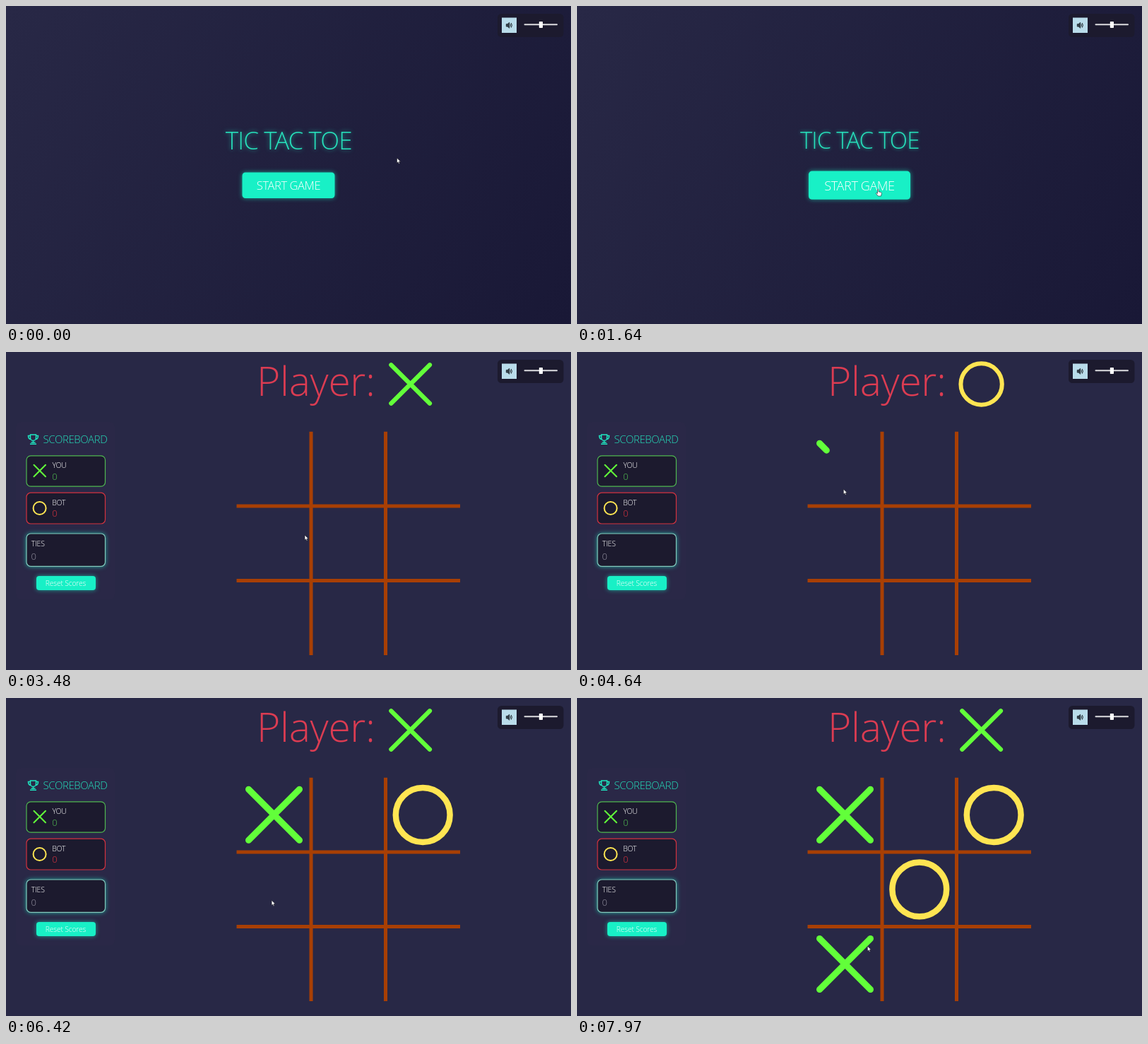
An HTML page for the animation above (8 s loop, 800 by 450 pixels).

```html
<!DOCTYPE html>
<html lang="en">
<head>
<meta charset="utf-8">
<title>Tic Tac Toe</title>
<style>
  html, body { margin: 0; width: 100%; height: 100%; overflow: hidden; background: #282846; }
  svg { display: block; width: 100vw; height: 100vh; }
  text { font-family: "Open Sans", "Noto Sans", sans-serif; font-weight: 300; }
  .mid { text-anchor: middle; }
  .mark { fill: none; stroke-linecap: round; }
  .glow { filter: drop-shadow(0 0 3px rgba(24, 236, 196, .6)); }
  .card { fill: #1c1a2e; stroke-width: 1.2; }
</style>
</head>
<body>
<svg id="stage" viewBox="0 0 800 450">
  <defs>
    <linearGradient id="bg" gradientUnits="userSpaceOnUse" x1="2.6" y1="-4.5" x2="797.4" y2="454.5">
      <stop stop-color="#282846"/><stop offset="1" stop-color="#191836"/>
    </linearGradient>
  </defs>
  <rect width="800" height="450" fill="#282846"/>

  <g id="menu">
    <rect width="800" height="450" fill="url(#bg)"/>
    <g id="title" class="glow">
      <text class="mid" y="12.5" font-size="35" letter-spacing="-.9" fill="#27dfba">TIC TAC TOE</text>
    </g>
    <g id="start">
      <rect class="glow" x="-65.5" y="-18.3" width="131" height="36.6" rx="4.5" fill="#18f0c6"/>
      <text class="mid" y="6.5" font-size="16.5" letter-spacing="-.4" fill="#fff">START GAME</text>
    </g>
  </g>

  <g id="game">
    <rect x="14" y="99" width="140" height="251" rx="7" fill="#2a2847"/>
    <g fill="none" stroke="#1fe6c0" stroke-width="1.5">
      <path d="M34.5 117h8v4.5a4 4 0 0 1-8 0zM34.5 118.5h-3q0 5 4 5M42.5 118.5h3q0 5-4 5M38.5 125.5v3M34 130.2h9"/>
      <path d="M35.5 128h6"/>
    </g>
    <text x="52.5" y="129" font-size="15" letter-spacing="-.4" fill="#25dcb9">SCOREBOARD</text>

    <rect class="card" x="29" y="146.8" width="111.5" height="43.4" rx="6" stroke="#4fb850"/>
    <path class="mark" d="M39.5 159.8l16.5 16.5M56 159.8l-16.5 16.5" stroke="#62ff3a" stroke-width="2"/>
    <text x="65.5" y="164.2" font-size="10.5" letter-spacing="-.3" fill="#fff">YOU</text>
    <text x="65.3" y="180.5" font-size="13" fill="#4fb850">0</text>

    <rect class="card" x="29" y="199.2" width="111.5" height="43.8" rx="6" stroke="#d3323f"/>
    <circle class="mark" cx="47.6" cy="221" r="9" stroke="#ffe552" stroke-width="2"/>
    <text x="65.2" y="217" font-size="10.5" letter-spacing="-.3" fill="#fff">BOT</text>
    <text x="65.3" y="233.3" font-size="13" fill="#d3323f">0</text>

    <rect class="card glow" x="29" y="257" width="111.5" height="46.3" rx="6" stroke="#83c9bd"/>
    <text x="35.8" y="275" font-size="10.5" letter-spacing="-.2" fill="#fff">TIES</text>
    <text x="35.5" y="293.5" font-size="13" fill="#8d8b9a">0</text>

    <rect class="glow" x="43" y="317" width="84" height="20" rx="4" fill="#18f0c6"/>
    <text class="mid" x="84.5" y="331" font-size="10.3" letter-spacing="-.15" fill="#fff">Reset Scores</text>

    <text x="355" y="62" font-size="57" letter-spacing="-.3" fill="#dc3c52">Player:</text>
    <path id="turnX" class="mark" d="M545.3 18.3l54.7 54.5M600 18.3l-54.7 54.5" stroke="#62ff3a" stroke-width="6.2"/>
    <circle id="turnO" class="mark" cx="572.6" cy="45.5" r="29.2" stroke="#ffe552" stroke-width="6"/>
    <g id="grid" stroke="#a83f04" stroke-width="5"></g>
    <g id="marks"></g>
  </g>

  <rect x="696" y="11" width="93.5" height="33" rx="5.5" fill="#1c1a2e"/>
  <rect x="702" y="16.5" width="21" height="21.5" fill="#b9dcea"/>
  <path d="M708.3 25.5h1.8l2.6-2.2v8l-2.6-2.2h-1.8z" fill="#33404a" stroke="#1b2229" stroke-width=".7"/>
  <path d="M714 25.5q1.2 1.8 0 3.6M715.2 24q2.4 3.3 0 6.6" fill="none" stroke="#1b2229"/>
  <rect x="733.5" y="25.2" width="47.5" height="2" rx="1" fill="#dddde0"/>
  <rect x="754.8" y="22" width="5.2" height="9" rx=".8" fill="#fff"/>

  <g id="cursor" fill="#fff" stroke="#15151f" stroke-width=".6" stroke-linejoin="round">
    <path id="arrow" d="M0 0V7.2L1.6 5.8 2.7 8.2 3.9 7.7 2.9 5.3H5.2Z"/>
    <path id="hand" d="M0 .6Q.8-.5 1.5.6V3.8L5 4.6Q6 5 5.8 6.4L5 10H.8L-2 6.4Q-2 5.2-1 5.6L0 6.4Z"/>
  </g>
</svg>
<script>
const LOOP = 8000, MENU_END = 2400, GAME_START = 2550;
const GREEN = '#62ff3a', YELLOW = '#ffe552';
const $ = id => document.getElementById(id);
const clamp = v => Math.max(0, Math.min(1, v));
const span = (t, from, ms) => clamp((t - from) / ms);
const ease = p => p * p * (3 - 2 * p);
const show = (el, on) => el.setAttribute('display', on ? 'inline' : 'none');

// Parts that draw themselves along their length
const strokes = [];
function stroke(parent, tag, attrs, start, ms) {
  const el = document.createElementNS('http://www.w3.org/2000/svg', tag);
  for (const key in attrs) el.setAttribute(key, attrs[key]);
  el.setAttribute('pathLength', 1);
  parent.append(el);
  strokes.push({ el, start, ms });
}

function addX(x, y, start) {
  const base = { class: 'mark', stroke: GREEN, 'stroke-width': 9 };
  stroke($('marks'), 'path', { ...base, d: `M${x - 36} ${y - 36}l72 72` }, start, 300);
  stroke($('marks'), 'path', { ...base, d: `M${x + 36} ${y - 36}l-72 72` }, start + 300, 300);
}

function addO(cx, cy, start) {
  stroke($('marks'), 'circle',
    { class: 'mark', stroke: YELLOW, 'stroke-width': 8.5, cx, cy, r: 38.4 }, start, 320);
}

[432, 537.5].forEach(x => stroke($('grid'), 'path', { d: `M${x} 112.8v316.2` }, GAME_START, 500));
[218, 323.5].forEach(y => stroke($('grid'), 'path', { d: `M326.5 ${y}h316.5` }, GAME_START, 500));

const turns = [[4600, 5150], [7095, 7610]];
addX(379.5, 165.3, turns[0][0]);
addO(590.2, 165.5, turns[0][1]);
addX(379.5, 376.5, turns[1][0]);
addO(484.8, 270.8, turns[1][1]);

// Pointer moves: start, duration, x, y
const home = [553.5, 215];
const moves = [
  [250, 1000, 425.5, 259],
  [1700, 600, 423, 259],
  [3600, 800, 377.3, 194],
  [5900, 1000, 375, 367.5],
  [7350, 500, 411.3, 351]
];

function pointer(t) {
  let [x, y] = home;
  for (const [start, ms, tx, ty] of moves) {
    const p = ease(span(t, start, ms));
    x += (tx - x) * p;
    y += (ty - y) * p;
  }
  return [x, y];
}

function draw(t) {
  const inMenu = t < MENU_END;
  show($('menu'), inMenu);
  show($('game'), t >= GAME_START);

  const pulse = .971 + .029 * Math.cos(t / 3000 * 2 * Math.PI);
  $('title').setAttribute('transform', `translate(400.2 190.5) scale(${pulse})`);
  const hover = 1 + .1 * ease(span(t, 860, 300));
  $('start').setAttribute('transform', `translate(400 253.7) scale(${hover})`);

  for (const { el, start, ms } of strokes) {
    const p = span(t, start, ms);
    show(el, p > 0);
    el.setAttribute('stroke-dasharray', p < 1 ? `${p} 2` : 'none');
  }

  const botTurn = turns.some(([from, to]) => t >= from && t < to);
  show($('turnX'), !botTurn);
  show($('turnO'), botTurn);

  const [x, y] = pointer(t);
  $('cursor').setAttribute('transform', `translate(${x} ${y})`);
  const hand = inMenu && t > 860;
  show($('hand'), hand);
  show($('arrow'), !hand);
}

function tick() {
  draw(performance.now() % LOOP);
  requestAnimationFrame(tick);
}
tick();
</script>
</body>
</html>
```
